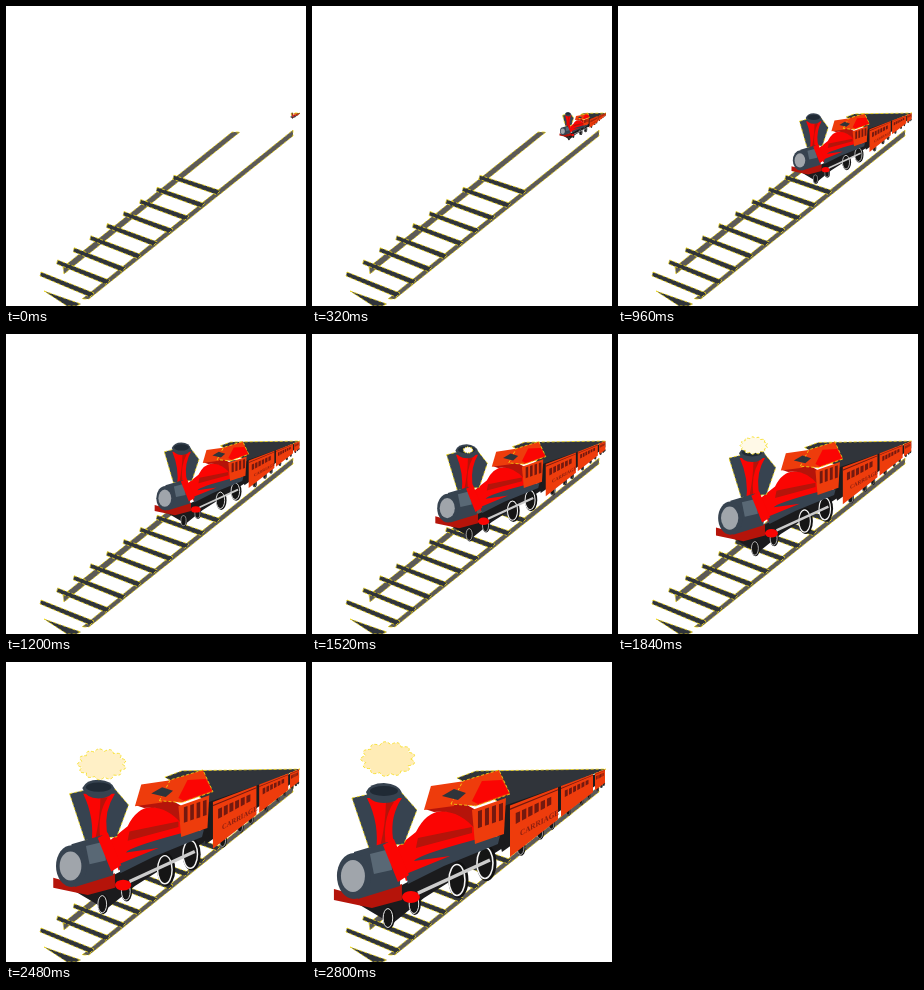
An HTML page for the animation above (2.88 s loop, 300 by 300 pixels).

```html
<!DOCTYPE html>
<html lang="en">
<head>
<meta charset="utf-8">
<title>Steam train</title>
<style>
html, body { margin: 0; width: 100%; height: 100%; overflow: hidden; background: #fff; }
svg { display: block; width: 100%; height: 100%; }
.edge { stroke: #f5dc14; stroke-width: .8; stroke-dasharray: 3 2; vector-effect: non-scaling-stroke; }
.red { fill: #fb0503; }
.deep { fill: #b5140a; }
.orange { fill: #ee3c0c; }
.slate { fill: #374350; }
.dark { fill: #30343a; }
.black { fill: #1b1b1d; }
.pane { fill: #74190f; }
.rail { fill: #5c5a58; }
</style>
</head>
<body>
<svg viewBox="0 0 300 300">
  <g id="track"></g>
  <g id="train">
    <path class="dark edge" d="M145 116L164 109L294 107L199 147Z"/>
    <path class="black" d="M180 148L293 109V117L190 190Z"/>
    <g id="cars"></g>

    <!-- undercarriage -->
    <path class="black" d="M36 236L88 224L190 172L194 184L112 236L80 262Z"/>
    <g id="wheels"></g>

    <!-- boiler -->
    <path class="red" d="M84 186L104 170Q114 150 130 149Q148 148 162 164L188 172L132 200L94 219Z"/>
    <path class="deep" d="M106 176Q130 171 160 165V171L104 186Z"/>
    <path class="slate" d="M102 199Q106 193 162 178L188 174L186 182L132 204L96 222L94 212L138 194Z"/>

    <!-- cab -->
    <path class="deep" d="M113 147L146 138L164 148V168Q146 146 122 150Z"/>
    <path class="orange" d="M119 124L153 119L142 144L112 148Z"/>
    <path class="orange" d="M160 148L194 136L192 172L163 182Z"/>
    <g id="slots" class="pane"></g>
    <path class="orange edge" d="M139 142L151 119L187 108L198 132L164 144Z"/>
    <path class="red" d="M160 139L170 119L190 118L197 131L166 142Z"/>
    <path class="dark" d="M130 134L142 127L154 131L146 138Z"/>

    <g id="stack">
      <path class="slate edge" d="M40 136L62 131H90L105 148L92 182L57 186Z"/>
      <path class="red" d="M55 136H90Q78 154 81 176L84 186L64 190Q68 162 55 136Z"/>
      <path class="deep" d="M74 140H82Q70 158 74 184L68 186Q74 160 74 140Z"/>
      <path class="slate" d="M54 130Q58 121 72 121Q87 122 90 131Q86 141 72 141Q58 141 54 130Z"/>
      <ellipse cx="72" cy="129" rx="14" ry="5" fill="#202a35"/>
    </g>

    <!-- smokebox and buffer beam -->
    <path class="deep" d="M22 227L48 234L90 222V238L60 246L22 238Z"/>
    <path class="slate" d="M42 190L76 180Q90 192 88 224L46 237Z"/>
    <path fill="#596875" d="M58 192L74 188Q80 198 80 208L62 212Z"/>
    <ellipse class="slate" cx="42" cy="214" rx="17" ry="23"/>
    <ellipse cx="41" cy="214" rx="12" ry="16" fill="#a0a5ab"/>
    <path class="red" d="M71 183L82 177L97 213L86 220Z"/>

    <!-- piston and rod -->
    <ellipse class="red" cx="99" cy="235" rx="9" ry="6"/>
    <path fill="none" stroke="#ccc" stroke-width="3.500" d="M106 231L178 198"/>
    <path id="smoke" class="edge"/>
  </g>
</svg>
<script>
const $ = id => document.getElementById(id);
const STEP = 80, COUNT = 36, VX = 294, VY = 107;

const poly = (cls, pts) =>
  `<path class="${cls}" d="M${pts.map(p => p.map(v => v.toFixed(2)).join(' ')).join('L')}Z"/>`;

// A point on the carriage sides: v runs from the roof line (0) to the sill (1)
function side(x, v) {
  const far = VX - x, top = VY + .38 * far, sill = 120 + .78 * far;
  return [x, top + (sill - top) * v];
}
const panel = (cls, a, b, v, w) => poly(cls, [side(a, v), side(b, v), side(b, w), side(a, w)]);

function wheel(x, y, rx, ry) {
  return `<ellipse cx="${x + rx * .15}" cy="${y}" rx="${rx}" ry="${ry}" fill="#111"/>
    <ellipse cx="${x}" cy="${y}" rx="${rx * .8}" ry="${ry * .86}" fill="#151515" stroke="#f4f4f4" stroke-width="${rx * .16}"/>`;
}

function buildTrack() {
  let out = '<path class="rail edge" d="M57 261L226 126H234L58 268Z"/>' +
    '<path class="rail edge" d="M76 293L287 124V130L83 293Z"/>' +
    '<path class="dark edge" d="M38 285L75 298L70 300H61Z"/>';
  for (let i = 0; i < 9; i++) {
    const x = 35 + 16.6 * i, y = 266 - 12.1 * i;
    const u = 88 + 15.8 * i, v = 287 - 12.8 * i;
    out += poly('dark edge', [[x, y], [u, v], [u - 4, v + 4], [x - 1, y + 4]]);
  }
  $('track').innerHTML = out;
}

function car(a, b) {
  const len = b - a, at = f => a + len * f, panes = 6;
  let out = '';
  for (const f of [.22, .62, .86]) {
    const [x, y] = side(at(f), .98), h = side(x, 1)[1] - side(x, 0)[1];
    out += wheel(x, y, h * .09, h * .17);
  }
  out += panel('orange', a, b, 0, 1) + panel('pane', a, b, .06, .09);
  for (let i = 0; i < panes; i++) {
    const f = .12 + .13 * i;
    out += panel('pane', at(f), at(f + .09), .2, .42);
  }
  return out;
}

function buildTrain() {
  const label = '<text transform="matrix(.9 -.5 0 1 208 174)" font-family="Liberation Serif, serif"' +
    ' font-size="8" font-weight="bold" fill="#8b1f10">CARRIAGE</text>';
  $('cars').innerHTML = car(283, 293) + car(249, 281) + car(198, 246) + label;
  $('wheels').innerHTML = wheel(173, 201, 10, 18) + wheel(145, 218, 10, 18) +
    wheel(102, 242, 6, 11) + wheel(76, 256, 6, 11);
  let slots = '';
  for (let x = 166; x < 190; x += 7) {
    const y = 204.500 - x / 3;
    slots += `<path d="M${x} ${y}l4 -1.400v17l-4 1.400z"/>`;
  }
  $('slots').innerHTML = slots;
}

function puff(cx, cy, w, h) {
  const lobes = 13, at = (i, k) => {
    const a = i / lobes * 2 * Math.PI;
    return `${cx + Math.cos(a) * w / 2 * k} ${cy + Math.sin(a) * h / 2 * k}`;
  };
  let d = 'M' + at(0, .88);
  for (let i = 1; i <= lobes; i++) d += `Q${at(i - .5, 1.25)} ${at(i, .88)}`;
  return d + 'Z';
}

function draw(n) {
  // Quick approach at first, then steadier
  const s = .035 + .034 * Math.min(n, 14) + .0233 * Math.max(n - 14, 0);
  $('train').setAttribute('transform',
    `translate(${VX} ${VY}) scale(${s}) translate(${-VX} ${-VY})`);

  // The stack is relatively taller in the distance
  const k = 1 + .35 * (1 - s);
  $('stack').setAttribute('transform', `translate(0 ${190 * (1 - k)}) scale(1 ${k})`);

  const u = Math.max(0, (n - 17) / 18), size = 1 - (1 - u) ** 3;
  const smoke = $('smoke');
  smoke.style.display = u ? '' : 'none';
  smoke.setAttribute('d', puff(74 + 2 * u, 129 - 32 * u ** .65, 52 * size, 33 * size));
  smoke.setAttribute('fill', `rgb(255 ${255 - 19 * u} ${255 - 73 * u})`);
}

function tick() {
  draw(Math.floor(performance.now() / STEP) % COUNT);
  requestAnimationFrame(tick);
}

buildTrack();
buildTrain();
tick();
</script>
</body>
</html>
```
